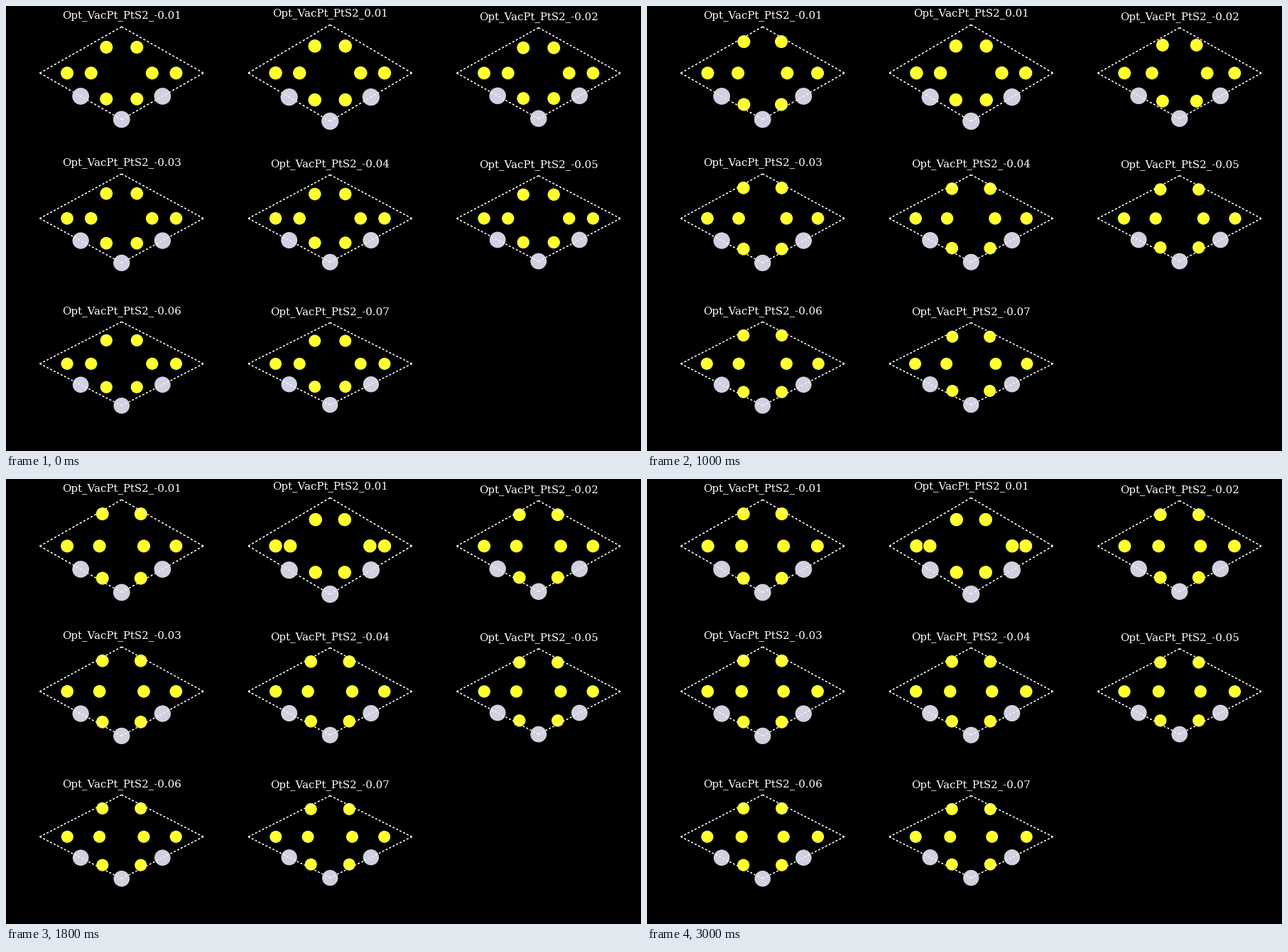
A matplotlib script for the animation above (3.1 s loop, 894 by 626 pixels).

```python
import numpy as np
import matplotlib.pyplot as plt
from matplotlib.animation import FuncAnimation
from matplotlib.collections import LineCollection
from matplotlib.patches import Circle

W, H, DPI = 894, 626, 96
PT = 72 / DPI                      # points per pixel
FRAMES, INTERVAL = 31, 100

# strain of each cell -> frame at which its sulphur atoms are half relaxed
RISE = {-0.01: 8.4, 0.01: 13.2, -0.02: 10.2, -0.03: 6.4,
        -0.04: 6.9, -0.05: 6.2, -0.06: 6.1, -0.07: 8.4}

HALF_W = 115.2                     # half width of every cell
CELL_LENGTH, DASH_LENGTH = 7.14, 0.3
R_PT, R_S = 12.64, 9.76            # radii in the unstrained cell
PT_COLOR, S_COLOR = (0.816, 0.816, 0.878), (1.0, 1.0, 0.188)


def mix(a, b, f):
    return a + (b - a) * f


def smoothstep(t, start, end):
    u = np.clip((t - start) / (end - start), 0, 1)
    return u * u * (3 - 2 * u)


def dashed(p, q, count):
    """Equal dashes and gaps, with a dash at both ends."""
    p, q = np.array(p), np.array(q)
    step = (q - p) / (2 * count - 1)
    return [(p + 2 * i * step, p + (2 * i + 1) * step) for i in range(count)]


class Panel:
    def __init__(self, ax, index, strain, rise):
        row, col = divmod(index, 3)
        scale = 1 / (1 - strain)
        r_pt, r_s = R_PT * scale, R_S * scale
        mid = 100.6 + 204.3 * row
        self.strain, self.rise = strain, rise
        self.half_h = HALF_W / np.sqrt(3) * (1 + strain) * scale
        self.cx, self.cy = 162.75 + 293.5 * col, mid - r_pt / 2

        title_y = mid - 1.05 * (self.half_h + r_pt / 2) - 8.3
        ax.text(self.cx, title_y, f"Opt_VacPt_PtS2_{strain}", color="white",
                family="DejaVu Serif", size=15 * PT, ha="center", va="baseline")

        left, right, top, bottom = (
            (self.cx + dx * HALF_W, self.cy + dy * self.half_h)
            for dx, dy in ((-1, 0), (1, 0), (0, -1), (0, 1)))
        # the sides lengthen under shear, which can add a dash
        side = CELL_LENGTH * np.sqrt(1 - strain + strain ** 2)
        count = int(side / DASH_LENGTH)
        lines = [dash for p, q in ((bottom, left), (bottom, right),
                                   (left, top), (right, top))
                 for dash in dashed(p, q, count)]
        for z in (1, 4):           # lower and upper face of the cell
            ax.add_collection(LineCollection(
                lines, colors="white", linewidths=1.25 * PT,
                capstyle="butt", zorder=z), autolim=False)

        for dx, dy in ((-0.5, 0.5), (0.5, 0.5), (0, 1)):
            self.atom(ax, self.cx + dx * HALF_W, self.cy + dy * self.half_h,
                      r_pt, PT_COLOR, 2)
        self.sulphur = [self.atom(ax, 0, 0, r_s, S_COLOR, 3) for _ in range(8)]

    @staticmethod
    def atom(ax, x, y, r, color, z):
        return ax.add_patch(Circle((x, y), r, facecolor=color, edgecolor="black",
                                   linewidth=1.25 * PT, zorder=z))

    def offsets(self, t):
        """Offsets of the four mirrored sulphur pairs from the cell centre."""
        if self.strain < 0:        # atoms close in on the vacancy
            side_x, side_y, inner = 27.0, 0.698 + 0.36 * self.strain, 29.5
        else:                      # atoms move away from it
            side_x, side_y, inner = 20.5, 0.547, 58.0

        jump = 1 / (1 + np.exp((self.rise - t) / 0.8))
        creep = 0.7 * jump + 0.3 * smoothstep(t, 13, 22)
        lift = 0.5 - 32 * self.strain
        swing = np.interp(t, [0, 6, 8, 13, 18, 22, 30],
                          [0, 0.9, 1, 0.35, -0.1, 0.35, 0.48])

        x = mix(21.5, side_x, jump)
        y = mix(0.558, side_y, jump) * self.half_h
        return ((x, -y), (x, y), (76.7 + lift * swing, 0),
                (mix(43.0, inner, creep), 0))

    def update(self, t):
        places = [(sign * x, y) for x, y in self.offsets(t) for sign in (-1, 1)]
        for circle, (x, y) in zip(self.sulphur, places):
            circle.center = (self.cx + x, self.cy + y)


fig = plt.figure(figsize=(W / DPI, H / DPI), dpi=DPI, facecolor="black")
ax = fig.add_axes([0, 0, 1, 1])
ax.set_xlim(0, W)
ax.set_ylim(H, 0)
ax.axis("off")

panels = [Panel(ax, i, s, rise) for i, (s, rise) in enumerate(RISE.items())]


def draw(n):
    for panel in panels:
        panel.update(n)
    return [c for panel in panels for c in panel.sulphur]


anim = FuncAnimation(fig, draw, frames=FRAMES, init_func=lambda: draw(0),
                     interval=INTERVAL, repeat=True, repeat_delay=0, blit=False)
plt.show()
```
